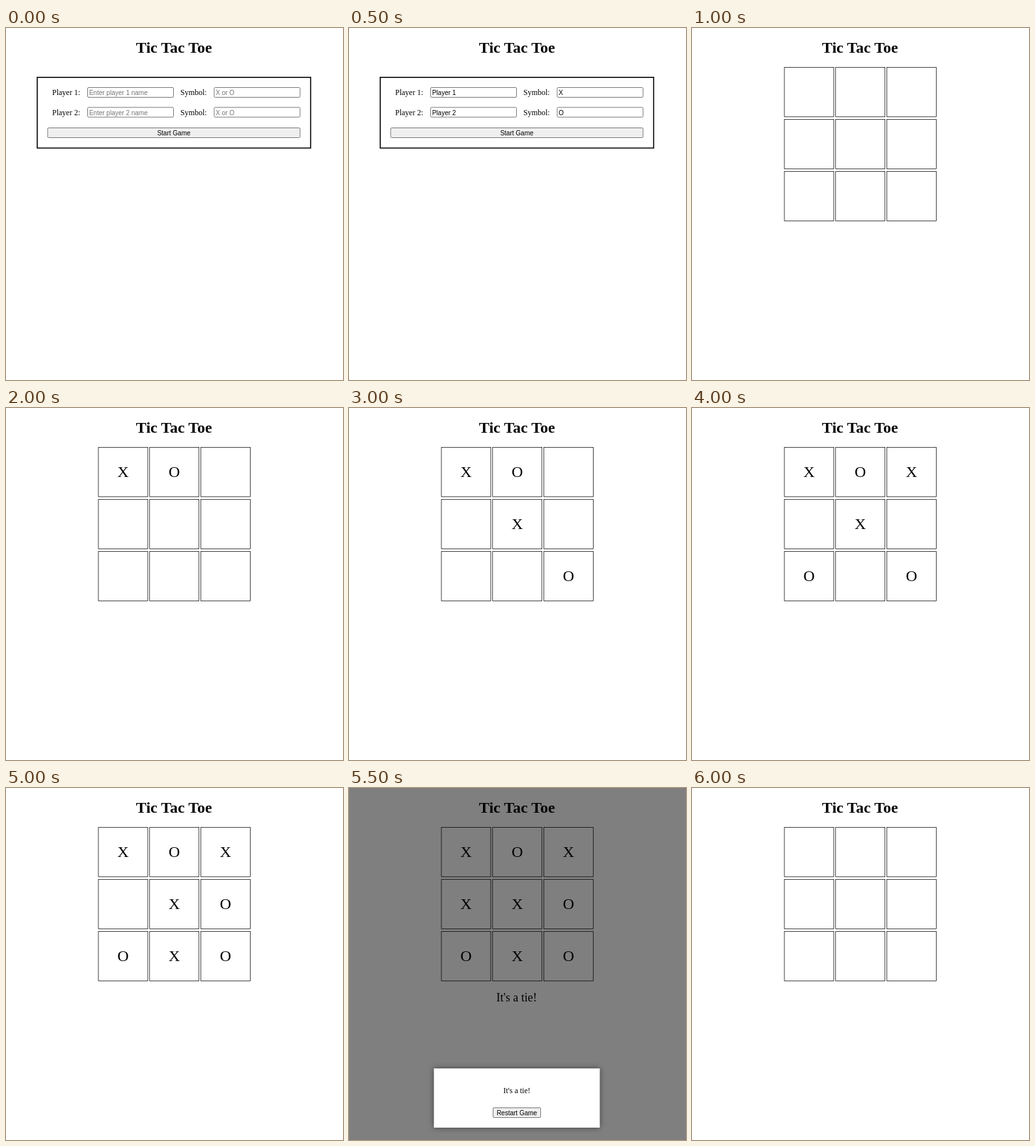
An HTML page that plays this animation: 518 px wide and 541 px high, repeating every 6500 ms.

```html
<!DOCTYPE html>
<html lang="en">
<head>
<meta charset="utf-8">
<title>Tic Tac Toe</title>
<style>
  html, body { margin: 0; width: 100%; height: 100%; overflow: hidden; background: #fff; }
  svg { display: block; }
  text { font: 12px "Liberation Serif", "Times New Roman", serif; }
  .title { font-size: 24px; font-weight: bold; }
  .mark { font-size: 24px; }
  .result { font-size: 18px; }
  .ui { font: 10px "Liberation Sans", Arial, sans-serif; }
  .hint { fill: #757575; }
  .mid { text-anchor: middle; }
  .field, .button { fill: #fff; stroke: #767676; }
  .button { fill: #efefef; }
  .cell { fill: none; stroke: #000; stroke-width: .75; }
  .panel { fill: none; stroke: #000; stroke-width: 1.6; }
  .dialog { fill: #fff; filter: drop-shadow(0 0 4px rgba(0, 0, 0, .5)); }
</style>
</head>
<body>
<svg id="stage" width="518" height="541" viewBox="0 0 518 541"></svg>
<script>
const STEP = 500, LOOP = 6500;
const MOVES = [0, 1, 4, 8, 2, 6, 7, 5, 3];   // cell of each turn, X first
const FIRST_MOVE = 3, TIE = 11;
const PITCH_X = 78.75, PITCH_Y = 80.1, CELL = 75.9;
const stage = document.getElementById("stage");

const text = (x, y, cls, str) => `<text x="${x}" y="${y}" class="${cls}">${str}</text>`;
const rect = (x, y, w, h, cls, r = 0) =>
  `<rect x="${x}" y="${y}" width="${w}" height="${h}" rx="${r}" class="${cls}"/>`;
const field = (x, y, value, hint) =>
  rect(x + .5, y + .5, 132, 15, "field", 1.5) +
  text(x + 2.7, y + 12, value ? "ui" : "ui hint", value || hint);

function form(filled) {
  let out = rect(48, 75.8, 420.3, 108.7, "panel");
  for (const n of [1, 2]) {
    const y = 60.5 + n * 30.5;
    out += text(71, y + 12, "", `Player ${n}:`) + text(268, y + 12, "", "Symbol:") +
      field(125, y, filled && `Player ${n}`, `Enter player ${n} name`) +
      field(319.5, y, filled && "XO"[n - 1], "X or O");
  }
  return out + rect(64, 153.5, 388, 15, "button", 1.5) + text(258, 164.5, "ui mid", "Start Game");
}

function board(turns) {
  let out = "";
  for (let i = 0; i < 9; i++) {
    const x = 142 + i % 3 * PITCH_X, y = 60.4 + Math.floor(i / 3) * PITCH_Y;
    const turn = MOVES.indexOf(i);
    out += rect(x, y, CELL, CELL, "cell");
    if (turn < turns) out += text(x + CELL / 2, y + 45.7, "mark mid", "XO"[turn % 2]);
  }
  return out;
}

const tie = () =>
  text(257.7, 328, "result mid", "It's a tie!") +
  '<rect width="518" height="541" fill="#000" fill-opacity=".5"/>' +
  rect(130.5, 431, 255, 91, "dialog") +
  text(258, 469, "mid", "It's a tie!") +
  rect(221.5, 491.5, 73, 15, "button", 1.5) +
  text(258, 502.5, "ui mid", "Restart Game");

function scene(step) {
  const title = text(258.3, 38, "title mid", "Tic Tac Toe");
  if (step < 2) return title + form(step === 1);
  if (step > TIE) return title + board(0);
  return title + board(Math.max(0, step - FIRST_MOVE + 1)) + (step === TIE ? tie() : "");
}

let shown = -1;
function draw() {
  const step = Math.floor(performance.now() % LOOP / STEP);
  if (step !== shown) stage.innerHTML = scene(shown = step);
  requestAnimationFrame(draw);
}
draw();
</script>
</body>
</html>
```
